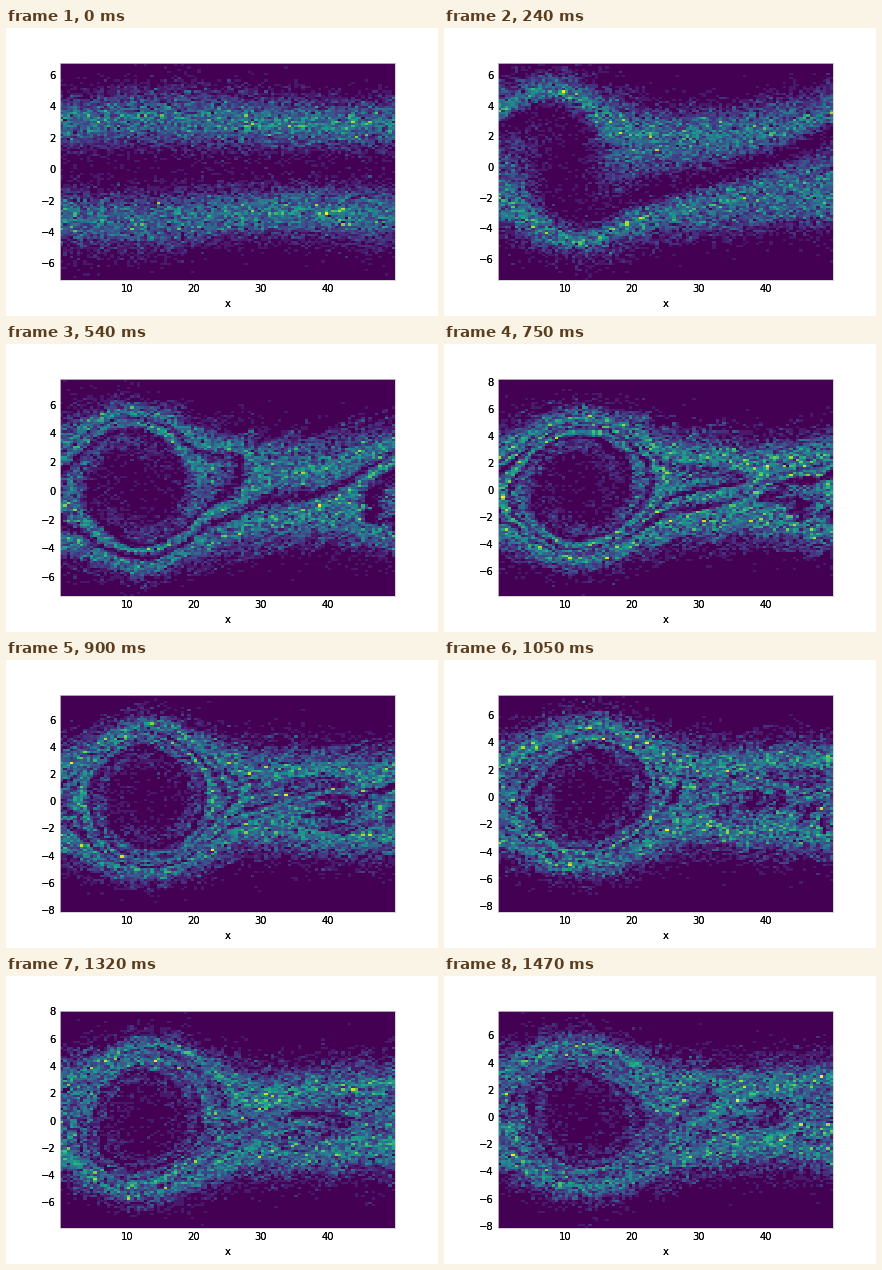
Animation, 432 px wide and 288 px high, one loop 1500 ms. Source, as a matplotlib script:

```python
import numpy as np
import matplotlib.pyplot as plt
from matplotlib.animation import FuncAnimation

# Two-stream instability: a 1D particle-in-cell plasma shown in phase space.
FRAMES, INTERVAL = 50, 30
N, CELLS, BOX, BINS = 20000, 400, 50.0, 100
BEAM, THERMAL, RIPPLE, DT = 3.0, 1.0, 0.1, 1.0
DX = BOX / CELLS

# Velocity limits: a few (frame, low, high) points, linear in between.
KEYS = np.array([
    (0, -7.05, 6.77), (8, -7.37, 6.82), (18, -7.33, 7.82), (25, -7.88, 8.25),
    (35, -8.42, 7.48), (44, -7.87, 8.06), (49, -8.16, 7.82),
])


def acceleration(pos):
    s = pos / DX
    left = np.floor(s).astype(int)
    w = s - left
    left %= CELLS
    right = (left + 1) % CELLS
    density = (np.bincount(left, 1 - w, CELLS)
               + np.bincount(right, w, CELLS)) * CELLS / N
    face = -np.cumsum(density - 1) * DX
    face -= face.mean()
    field = (face + np.roll(face, 1)) / 2
    return -((1 - w) * field[left] + w * field[right])


def limits(i):
    return [np.interp(i, KEYS[:, 0], KEYS[:, c]) for c in (1, 2)]


def simulate():
    rng = np.random.RandomState(42)
    pos = rng.rand(N) * BOX
    vel = THERMAL * rng.randn(N) + BEAM
    vel[N // 2:] *= -1
    vel *= 1 + RIPPLE * np.sin(2 * np.pi * pos / BOX)
    acc = acceleration(pos)
    maps = []
    for i in range(FRAMES):
        vel += acc * DT / 2
        pos = (pos + vel * DT) % BOX
        acc = acceleration(pos)
        vel += acc * DT / 2
        h = np.histogram2d(pos, vel, BINS, [[0, BOX], limits(i)])[0]
        maps.append(h.T)
    return maps


maps = simulate()

plt.rcParams.update({"font.family": "DejaVu Sans", "font.size": 10})
fig = plt.figure(figsize=(6, 4), dpi=72, facecolor="white")
ax = fig.add_axes([0.125, 0.125, 0.775, 0.755])
ax.set(xticks=[], yticks=[], xlim=(0, BOX))
for spine in ax.spines.values():
    spine.set(color="0.8", linewidth=0.8)
image = ax.imshow(maps[0], cmap="viridis", origin="lower", aspect="auto",
                  interpolation="nearest")


def label(text, xy, coords, offset, ha, va):
    # Two stacked copies give the heavier strokes.
    return [ax.annotate(text, xy, xycoords=coords, xytext=offset,
                        textcoords="offset points", ha=ha, va=va,
                        annotation_clip=False) for _ in range(2)]


for x in range(10, 50, 10):
    label(str(x), (x, 0), ax.get_xaxis_transform(), (0, -4), "center", "top")
label("x", (0.5, 0), "axes fraction", (0, -27), "center", "baseline")
v_labels = {
    v: label(str(v).replace("-", "\u2212"), (0, v), ax.get_yaxis_transform(),
             (-4, 0), "right", "center_baseline")
    for v in range(-8, 9, 2)
}


def update(i):
    low, high = limits(i)
    image.set_data(maps[i])
    image.set_clim(0, maps[i].max())
    image.set_extent((0, BOX, low, high))
    ax.set_xlim(0, BOX)
    ax.set_ylim(low, high)
    for v, copies in v_labels.items():
        for text in copies:
            text.set_visible(low <= v <= high)
    return [image]


anim = FuncAnimation(fig, update, frames=FRAMES, interval=INTERVAL,
                     repeat=True, repeat_delay=0, blit=False)
plt.show()
```
